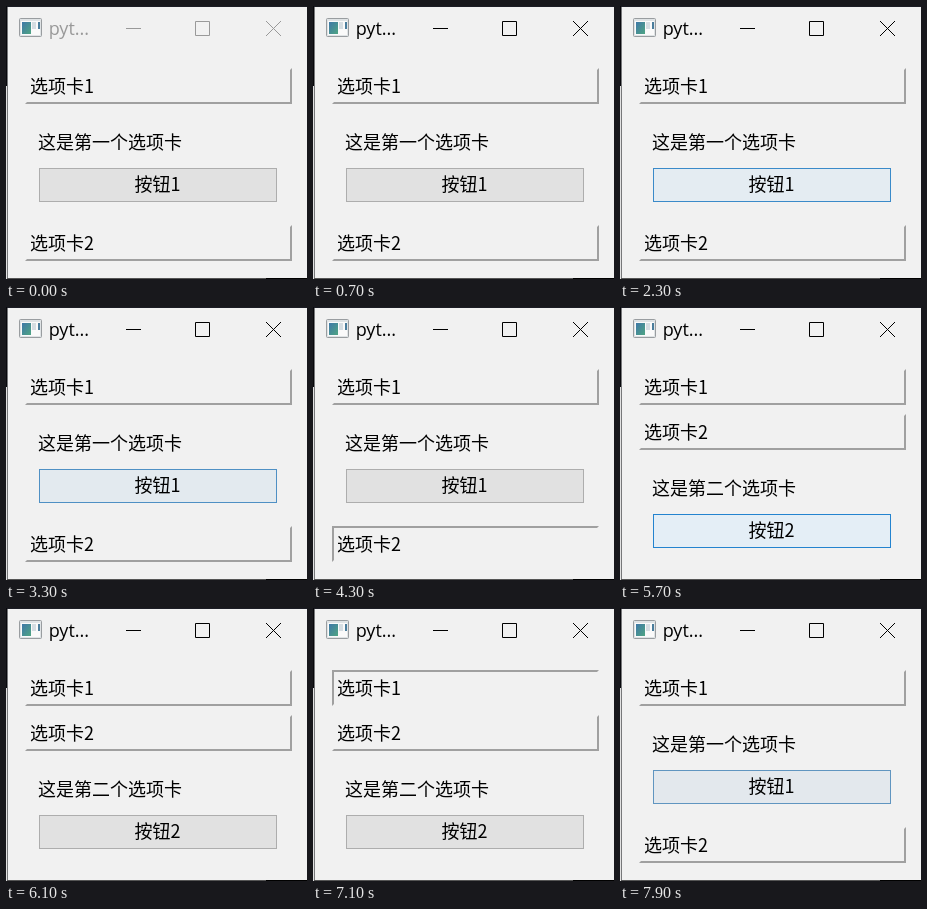
Recreate the animation shown at these times as an HTML page. Size 301 by 273 pixels, loop 8 s.

```html
<!DOCTYPE html>
<html lang="zh-CN">
<head>
<meta charset="utf-8">
<style>
html, body { margin: 0; width: 100%; height: 100%; overflow: hidden; background: #f1f1f1; }
svg { display: block; }
text { font: 18px "Noto Sans CJK SC", "Noto Sans CJK", sans-serif; }
#title { font-family: "Open Sans", "Noto Sans", sans-serif; }
</style>
</head>
<body>
<svg width="301" height="273" viewBox="0 0 301 273">
  <defs>
    <linearGradient id="teal" x2="1" y2="1">
      <stop stop-color="#3f78a8"/><stop offset="1" stop-color="#4fa583"/>
    </linearGradient>
  </defs>

  <!-- desktop showing around the window -->
  <rect width="301" height="1" fill="#1c1d25"/>
  <rect width="1" height="80" fill="#08080c"/>
  <rect y="80" width="1" height="193" fill="#e2e2e2"/>
  <rect x="1" y="1" width="1" height="271" fill="#77787a"/>
  <rect x="1" y="272" width="259" height="1" fill="#555"/>
  <rect x="260" y="272" width="41" height="1" fill="#000"/>

  <g id="icon">
    <rect x="13.5" y="12.5" width="22" height="18" rx="1" fill="#dfe3e5" stroke="#999da0"/>
    <rect x="15" y="15" width="19" height="14" fill="#fafafa"/>
    <rect x="16" y="16" width="9" height="12" fill="url(#teal)"/>
    <rect x="26" y="16" width="4" height="7" fill="#d5dde2"/>
    <rect x="32" y="16" width="2" height="7" fill="#4a7d9c"/>
  </g>
  <g id="caption">
    <text id="title" x="42.7" y="28.5">pyt...</text>
    <path d="M120 22.5H135M189.5 15.5h14v14h-14zM260 15l15 15M275 15l-15 15" fill="none" stroke="currentColor"/>
  </g>

  <g id="tab1"></g>
  <g id="tab2"></g>
  <g id="page">
    <text id="label" x="32" y="143"></text>
    <rect id="button" x="33.5" y="162.5" width="237" height="33"/>
    <text id="buttonText" x="151.5" y="185" text-anchor="middle"></text>
  </g>
</svg>
<script>
const $ = id => document.getElementById(id);
const LOOP = 8000, TICK = 200, PAGE_SHIFT = 45;

const mix = (a, b, k) => `rgb(${a.map((v, i) => Math.round(v + (b[i] - v) * k))})`;
const within = (t, from, to) => t >= from && t < to;
const ramp = (t, from, to) => Math.min(1, Math.max(0, (t - from) / (to - from)));

// the highlight fades linearly, but the screen refreshes only once per tick
function hover(t, second) {
  t = Math.floor((t - 100) / TICK) * TICK + 100;
  return second
    ? ramp(t, 4300, 4900) - ramp(t, 5600, 6100)
    : ramp(t, 1500, 2700) - ramp(t, 3050, 3600) + ramp(t, 7700, 8150);
}

function makeTab(id, name) {
  $(id).innerHTML = `<path class="raised" d="M286 62V98H19L21 96H284V64z" fill="#a0a0a0"/>
    <path class="sunken" d="M19 62H286L284 64H21V96L19 98z" fill="#a0a0a0"/>
    <text x="24" y="86.5">${name}</text>`;
}

function setTab(id, dy, pressed) {
  const tab = $(id);
  tab.setAttribute("transform", `translate(0 ${dy})`);
  tab.querySelector(".raised").style.display = pressed ? "none" : "";
  tab.querySelector(".sunken").style.display = pressed ? "" : "none";
}

function draw(t) {
  const second = within(t, 4500, 7300);
  const k = hover(t, second);

  $("caption").style.color = $("title").style.fill = t >= 500 ? "#000" : "#999";
  setTab("tab1", 0, within(t, 500, 700) || within(t, 7100, 7300));
  setTab("tab2", second ? PAGE_SHIFT : 157, within(t, 4300, 4500));

  $("page").setAttribute("transform", `translate(0 ${second ? PAGE_SHIFT : 0})`);
  $("label").textContent = `这是第${second ? "二" : "一"}个选项卡`;
  $("buttonText").textContent = "按钮" + (second ? 2 : 1);
  $("button").style.fill = mix([225, 225, 225], [229, 241, 251], k);
  $("button").style.stroke = mix([173, 173, 173], [0, 120, 215], k);
}

makeTab("tab1", "选项卡1");
makeTab("tab2", "选项卡2");
const start = performance.now();
function tick() {
  draw((performance.now() - start) % LOOP);
  requestAnimationFrame(tick);
}
tick();
</script>
</body>
</html>
```
